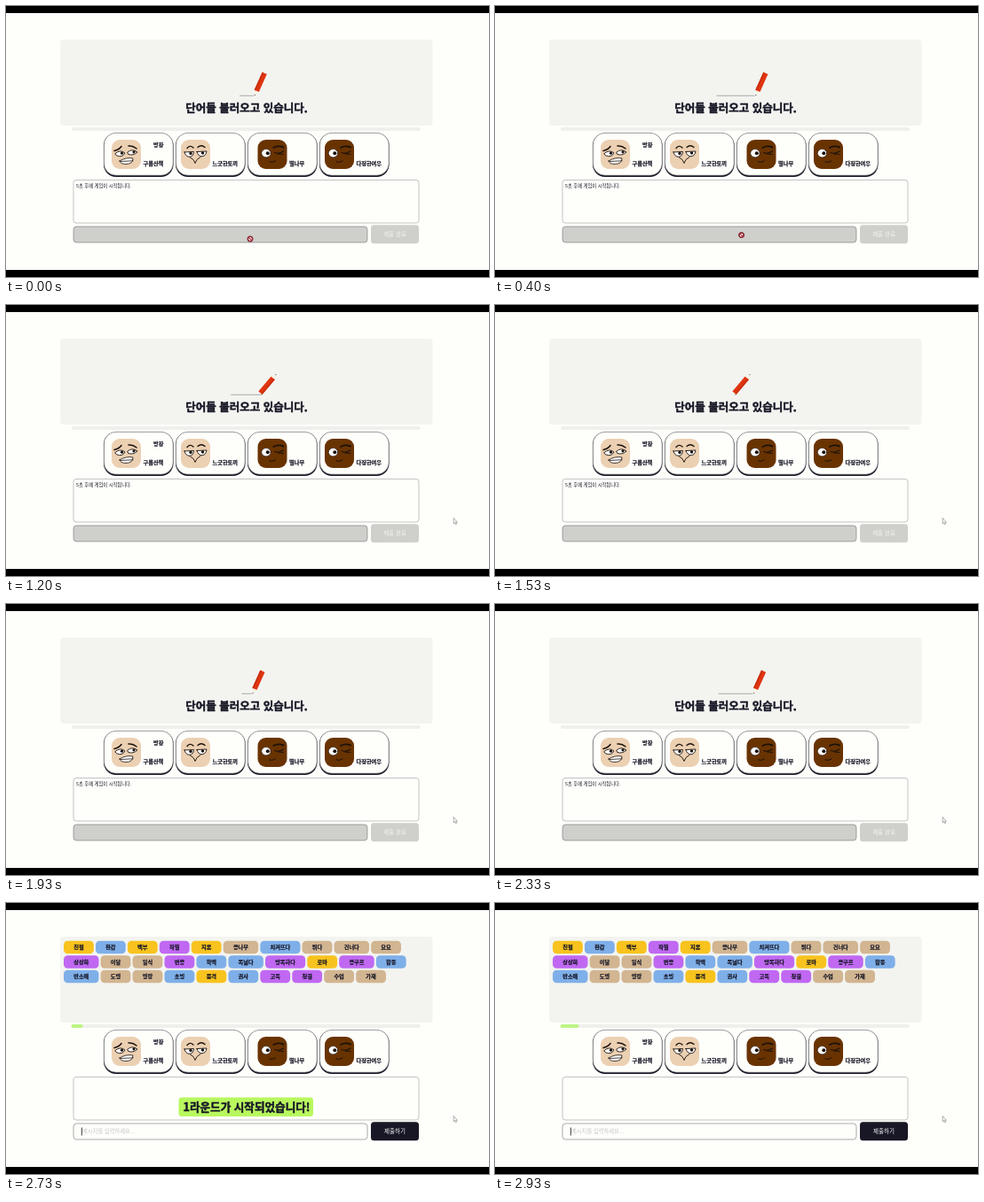
These frames come from a looping animation (544x306 px, 2.99 s). An HTML page:

```html
<!DOCTYPE html>
<html lang="ko">
<head>
<meta charset="utf-8">
<title>단어 게임</title>
<style>
  html, body { margin: 0; width: 100%; height: 100%; overflow: hidden; background: #fefefb; }
  svg { display: block; width: 100vw; height: 100vh; }
  text { font-family: "Noto Sans CJK KR", "Noto Sans CJK", "Noto Sans CJK JP", sans-serif; fill: #171726; }
  .bold { font-weight: 900; stroke: #171726; stroke-width: .035em; stroke-linejoin: round; }
  .face { fill: none; stroke: #1b120c; stroke-linecap: round; stroke-linejoin: round; }
</style>
</head>
<body>
<svg id="stage" viewBox="0 0 544 306">
  <defs>
    <g id="worried" class="face" stroke-width=".9">
      <path d="M3 12.500Q8 11.500 11 7.500M19 7Q24 6.500 28 10" stroke-width="1.500"/>
      <path d="M4 15.500Q10 10.500 15 15Q12 20.500 6 18ZM18 14Q23 9.500 29 14Q24 18.500 19 16.500Z" fill="#fff"/>
      <path d="M9 24Q16 19.500 24 21Q24 27.500 16 27.500Q10 27.500 9 24ZM10 24.500L24 23.800" fill="#fff" stroke-width=".8"/>
      <g fill="#1b120c" stroke="none"><circle cx="11.500" cy="15.200" r="1.600"/><circle cx="25" cy="13.800" r="1.600"/></g>
    </g>
    <g id="smug" class="face" stroke-width=".9">
      <path d="M7 9.500Q10 5.500 14 9M19 8.500Q23 5 27 8.500" stroke-width="1.400"/>
      <path d="M4 14L14.500 13.500Q14 19.500 9 19.300Q5 18.500 4 14ZM18 13.500L29 13Q28 19 23 18.800Q19 18 18 13.500Z" fill="#fff"/>
      <path d="M10.500 20Q15 22 16 26.500Q17 22 22 19.500"/>
      <g fill="#1b120c" stroke="none"><circle cx="11" cy="15.500" r="1.700"/><circle cx="24.500" cy="15" r="1.700"/></g>
    </g>
    <g id="wink" class="face" stroke-width="1">
      <path d="M18 9Q23 6 29 8.500" stroke-width="1.900"/>
      <path d="M19 14.500Q24 16.500 29 13M23 16L29 16.500" stroke-width="1.100"/>
      <path d="M13 25Q16 26.500 20 24"/>
      <ellipse cx="9.500" cy="15.200" rx="5.200" ry="4.700" fill="#fff" stroke-width=".6"/>
      <circle cx="11.300" cy="15.200" r="2" fill="#1b120c" stroke="none"/>
    </g>
  </defs>

  <rect width="544" height="306" fill="#fefefb"/>
  <rect x="61" y="38" width="419.500" height="97" rx="4" fill="#f3f4f0"/>
  <rect x="74" y="137" width="393" height="4" rx="2" fill="#eff0ec"/>
  <rect id="progress" x="73.500" y="137" height="4" rx="2" fill="#bdf584"/>
  <g id="cards"></g>
  <rect x="76" y="196.500" width="389" height="48.500" rx="3" fill="none" stroke="#888" stroke-width=".5"/>
  <rect id="input" x="76" y="249" width="331" height="18" rx="3.500" stroke="#666" stroke-width=".55"/>
  <rect id="button" x="411" y="247.300" width="54" height="21" rx="3.500"/>
  <text id="buttonText" x="438" y="260.200" font-size="6.500" text-anchor="middle"></text>

  <g id="loading">
    <line id="line" y1="101.300" y2="101.300" stroke="#aaa" stroke-width="1"/>
    <g id="pencil">
      <path d="M-2.800 -8L0 -14L2.800 -8Z" fill="#f8f1e5"/>
      <path d="M-.7 -12.500L0 -14L.7 -12.500Z" fill="#444"/>
      <rect x="-2.800" y="-8" width="5.600" height="22" fill="#df3510"/>
      <rect x="1.300" y="-8" width="1.500" height="22" fill="#c72c0c"/>
    </g>
    <text class="bold" x="271" y="120" font-size="12.500" text-anchor="middle">단어들 불러오고 있습니다.</text>
    <text x="79" y="205.400" font-size="5.300" font-weight="500">5초 후에 게임이 시작됩니다.</text>
  </g>

  <g id="game">
    <g id="words"></g>
    <text x="86" y="260.200" font-size="6.300" style="fill:#c6c6c6">메시지를 입력하세요...</text>
    <rect x="84.800" y="253.500" width=".9" height="9" fill="#222"/>
    <g id="message">
      <rect x="194.500" y="219.500" width="151.500" height="21.500" rx="3.500" fill="#b8f85e"/>
      <text class="bold" x="271" y="234.600" font-size="12.600" text-anchor="middle">1라운드가 시작되었습니다!</text>
    </g>
  </g>

  <g id="blocked">
    <circle r="2.700" fill="#fff" stroke="#5a1c24" stroke-width="1.500"/>
    <path d="M-1.900 -1.900L1.900 1.900" stroke="#b3283a" stroke-width="1.200"/>
    <circle r="2.600" fill="none" stroke="#b3283a" stroke-width=".9"/>
  </g>
  <path id="arrow" d="M-.8 -3.500V2.800L.6 1.600L1.600 3.800L2.600 3.300L1.700 1.300H3.300Z" fill="#fff" stroke="#777" stroke-width=".6"/>
  <path d="M0 0H544V8H0ZM0 298H544V306H0Z" fill="#000"/>
</svg>

<script>
const LOOP = 2990, STEP = 200 / 3, GAME_START = 2390, MESSAGE_END = 2800;
const byId = id => document.getElementById(id);
const set = (id, attrs) => {
  for (const key in attrs) byId(id).setAttribute(key, attrs[key]);
};
const show = (id, on) => set(id, { display: on ? "inline" : "none" });
const ramp = (t, from, to) => Math.min(1, Math.max(0, (t - from) / (to - from)));
const smooth = p => p * p * (3 - 2 * p);

// CSS "ease" timing: cubic-bezier(.25, .1, .25, 1)
function ease(p) {
  let lo = 0, hi = 1;
  for (let i = 0; i < 20; i++) {
    const s = (lo + hi) / 2;
    const x = .75 * s * (1 - s) + s ** 3;
    if (x < p) lo = s; else hi = s;
  }
  return .3 * lo * (1 - lo) ** 2 + 3 * lo * lo * (1 - lo) + lo ** 3;
}

function buildCards() {
  const light = "#ecd0b2", dark = "#693300";
  const players = [
    ["구름산책", 9, light, "worried"],
    ["느긋한토끼", 6, light, "smug"],
    ["별나무", 11.5, dark, "wink"],
    ["다정한여우", 6, dark, "wink"]
  ];
  byId("cards").innerHTML = players.map(([name, inset, skin, face], i) => `
    <g transform="translate(${110 + 81 * i} 143)">
      <rect y=".5" width="78.500" height="49.500" rx="14" fill="#171726"/>
      <rect x=".3" y=".3" width="77.900" height="47.900" rx="13.700" fill="#fefefb" stroke="#555" stroke-width=".5"/>
      <g transform="translate(${inset} 8)">
        <rect width="33" height="33" rx="9" fill="${skin}"/>
        <use href="#${face}"/>
      </g>
      <text class="bold" x="${inset + 35.5}" y="36.500" font-size="6.200">${name}</text>
      ${i ? "" : '<text class="bold" x="56" y="16.300" font-size="6.200">방장</text>'}
    </g>`).join("");
}

function buildWords() {
  const colors = { y: "#f8c31e", b: "#7fafe8", p: "#c068f2", t: "#d2b591" };
  const rows = [
    ["친절 환갑 백부 작별 지론 콩나무 치켜뜨다 튀다 건너다 요요", "ybypytbttt"],
    ["상상화 이달 일식 변종 학맥 폭넓다 방목하다 로마 콩쿠르 합동", "pttpbbpypb"],
    ["반소매 도명 명랑 초빙 품격 권사 고독 청결 수업 가재", "bttbybpptt"]
  ];
  byId("words").innerHTML = rows.map(([line, keys], row) => {
    let x = 65;
    const y = 42.7 + 16.5 * row;
    return line.split(" ").map((word, i) => {
      const width = 22.5 + 5.67 * word.length;
      const chip = `<rect x="${x}" y="${y}" width="${width}" height="14.500" rx="4.500" fill="${colors[keys[i]]}"/>
        <text class="bold" x="${x + width / 2}" y="${y + 9.4}" font-size="6.200" text-anchor="middle">${word}</text>`;
      x += width + 2.1;
      return chip;
    }).join("");
  }).join("");
}

// Write, flip, erase with the other end, flip back.
function drawPencil(t) {
  const phase = (t + 230) % 2000;
  const width = 61 * (ramp(phase, 0, 895) - ramp(phase, 1180, 1780));
  const angle = 204 + 196 * ease(ramp(phase, 880, 1240)) + 164 * ease(ramp(phase, 1790, 2000));
  const end = 271 + width / 2;
  set("line", { x1: 271 - width / 2, x2: end });
  set("pencil", { transform: `translate(${end + 6.7} 88.600) rotate(${angle})` });
}

function drawCursor(t) {
  const nudge = smooth(ramp(t, 60, 500)), away = smooth(ramp(t, 900, 1140));
  const x = 275 + 3 * nudge + 227 * away;
  const y = 263 - 5 * nudge - 14 * away;
  const blocked = x < 407 || (x > 411 && x < 465);
  show("blocked", blocked);
  show("arrow", !blocked);
  set(blocked ? "blocked" : "arrow", { transform: `translate(${x} ${y})` });
}

function render(t) {
  const playing = t >= GAME_START;
  show("loading", !playing);
  show("game", playing);
  show("message", t < MESSAGE_END);
  set("progress", { width: Math.max(0, t - 2400) * .0393 });
  set("input", { fill: playing ? "#fefefb" : "#cfd0cc" });
  set("button", { fill: playing ? "#171726" : "#cfd0cc" });
  byId("buttonText").textContent = playing ? "제출하기" : "제출 완료";
  byId("buttonText").style.fill = playing ? "#fff" : "#f4f4f2";
  drawPencil(t);
  drawCursor(t);
}

buildCards();
buildWords();
const start = performance.now();
function tick() {
  const t = (performance.now() - start) % LOOP;
  render(Math.floor((t + 3.4) / STEP) * STEP);
  requestAnimationFrame(tick);
}
tick();
</script>
</body>
</html>
```
